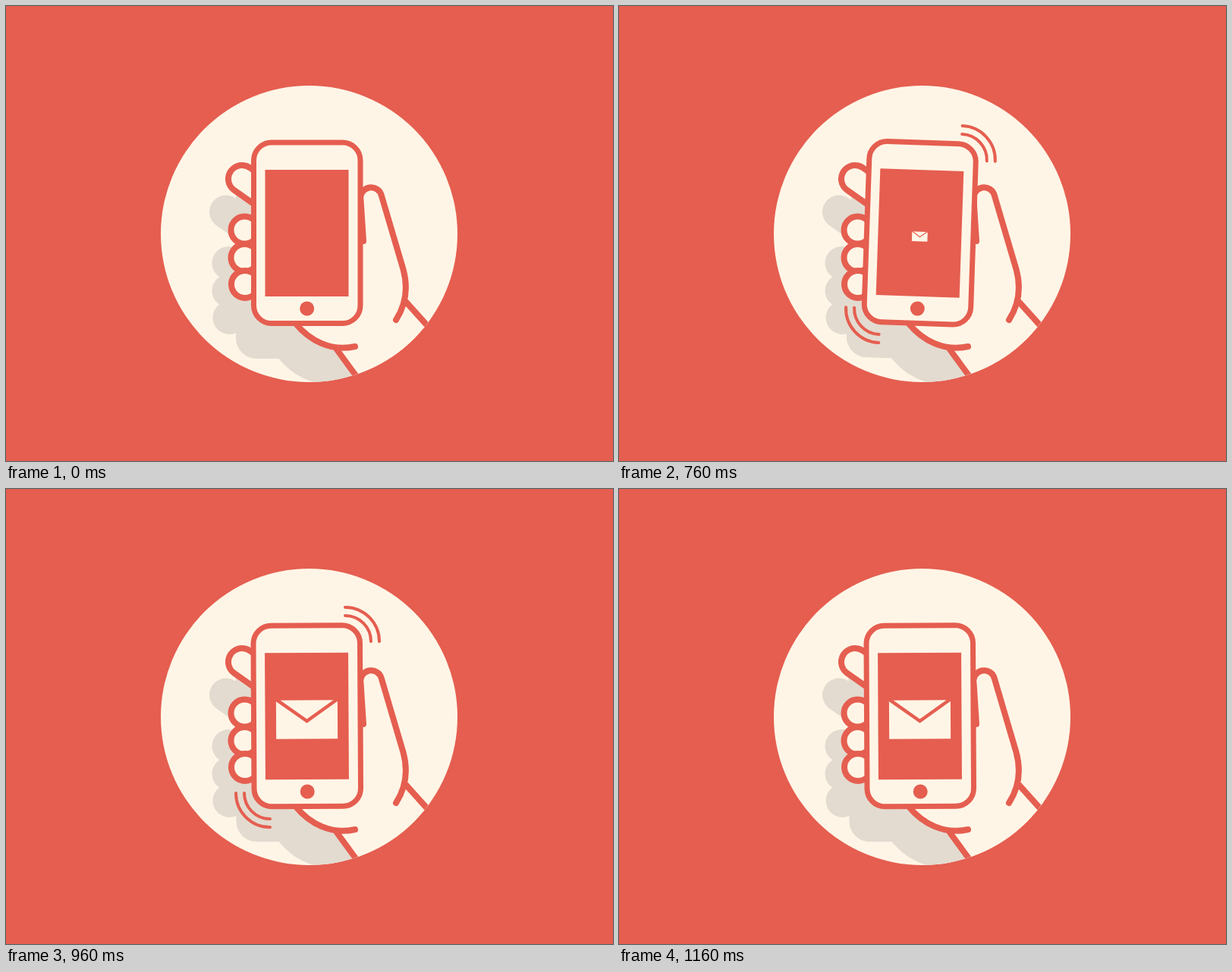
Animation, 800 px wide and 600 px high, one loop 2000 ms. Source, as an HTML page:

```html
<!DOCTYPE html>
<html lang="en">
<head>
<meta charset="utf-8">
<title>Message on phone</title>
<style>
  html, body { margin: 0; width: 100%; height: 100%; overflow: hidden; background: #e55e50; }
  svg { display: block; width: 800px; height: 600px; }
  .cream { fill: #fff5e6; }
  .red { fill: #e55e50; }
  .shade { fill: #e3dbd0; }
  .line { fill: none; stroke: #e55e50; stroke-width: 8; stroke-linecap: round; }
  .finger circle { fill: #fff5e6; stroke: #e55e50; stroke-width: 8; }
</style>
</head>
<body>
<svg viewBox="0 0 800 600">
  <clipPath id="disc"><circle cx="399.5" cy="300.5" r="195.5"/></clipPath>
  <circle class="cream" cx="399.5" cy="300.5" r="195.5"/>
  <g clip-path="url(#disc)">
    <g class="shade">
      <path d="M290 271.5L330 299.5" stroke="#e3dbd0" stroke-width="44" stroke-linecap="round"/>
      <circle cx="293.5" cy="339" r="22"/>
      <circle cx="293.5" cy="375.5" r="22"/>
      <circle cx="294.5" cy="411" r="22"/>
      <path d="M358 463C372 481 388 491 406 496L480 500L440 430H350Z"/>
      <g transform="translate(-20 43)">
        <rect id="phoneShade" x="323" y="176.5" width="147.5" height="245.5" rx="27"/>
      </g>
    </g>

    <path class="cream" d="M382 419C395 435 414 449 436 452L465 493L560 520V300H400Z"/>
    <g class="line">
      <path d="M471 310L467.5 256A14 14 0 0 1 495 250.5L523.5 347C530 371 527 394 514 414"/>
      <path d="M527 390L562 429"/>
      <path d="M382 419C400 441 428 456 460 449"/>
      <path d="M436 453L466 494"/>
    </g>

    <g stroke-linecap="round">
      <path d="M311 228L345 252" stroke="#e55e50" stroke-width="44"/>
      <path d="M311 228L345 252" stroke="#fff5e6" stroke-width="28"/>
    </g>
    <g class="finger">
      <circle cx="314.5" cy="295.5" r="18"/>
      <circle cx="314.5" cy="332" r="18"/>
      <circle cx="315" cy="367" r="18"/>
    </g>

    <g id="phone">
      <rect x="326.5" y="180" width="140.5" height="238.5" rx="23.5" fill="#fff5e6" stroke="#e55e50" stroke-width="7"/>
      <rect class="red" x="341.5" y="216" width="110" height="167"/>
      <circle class="red" cx="396.7" cy="399" r="9.5"/>
      <g id="mail">
        <rect class="cream" x="-40.5" y="-25.5" width="81" height="51"/>
        <path d="M-41 -27L0 2L41 -27" fill="none" stroke="#e55e50" stroke-width="4.5"/>
      </g>
    </g>

    <g id="waves" class="line" style="stroke-width:4">
      <path d="M447 156A45 45 0 0 1 492 201M447 167A34 34 0 0 1 481 201"/>
      <path d="M303 401A45 45 0 0 0 348 446M314 401A34 34 0 0 0 348 435"/>
    </g>
  </g>
</svg>
<script>
  const LOOP = 2000, STEP = 40, START = 560, REST = -0.3;
  const $ = id => document.getElementById(id);
  const clamp = v => Math.max(0, Math.min(1, v));
  const spin = (id, deg) => $(id).setAttribute('transform', `rotate(${deg} 396.75 299.5)`);

  function phoneAngle(step) {
    if (step < 0) return 0;
    if (step < 2) return REST / 2 * (step + 1);
    if (step > 13) return REST;
    return 1.95 + 2.25 * Math.cos(step * Math.PI / 2);
  }

  function waveOpacity(step) {
    if (step < 0 || step > 14) return 0;
    return step === 14 ? 0.5 : clamp((step + 1) / 4);
  }

  function draw(now) {
    const step = Math.floor((now % LOOP - START) / STEP);
    const angle = phoneAngle(step);
    spin('phone', angle);
    spin('phoneShade', angle);

    // The waves swing a quarter turn out of phase with the phone.
    spin('waves', 2.25 * Math.sin(Math.min(step, 13) * Math.PI / 2));
    $('waves').setAttribute('opacity', waveOpacity(step));

    const size = clamp((step - 4) / 3.95);
    $('mail').setAttribute('transform', `translate(396.5 304) scale(${size})`);
    $('mail').setAttribute('visibility', size ? 'visible' : 'hidden');
  }

  function tick() {
    draw(performance.now());
    requestAnimationFrame(tick);
  }
  tick();
</script>
</body>
</html>
```
